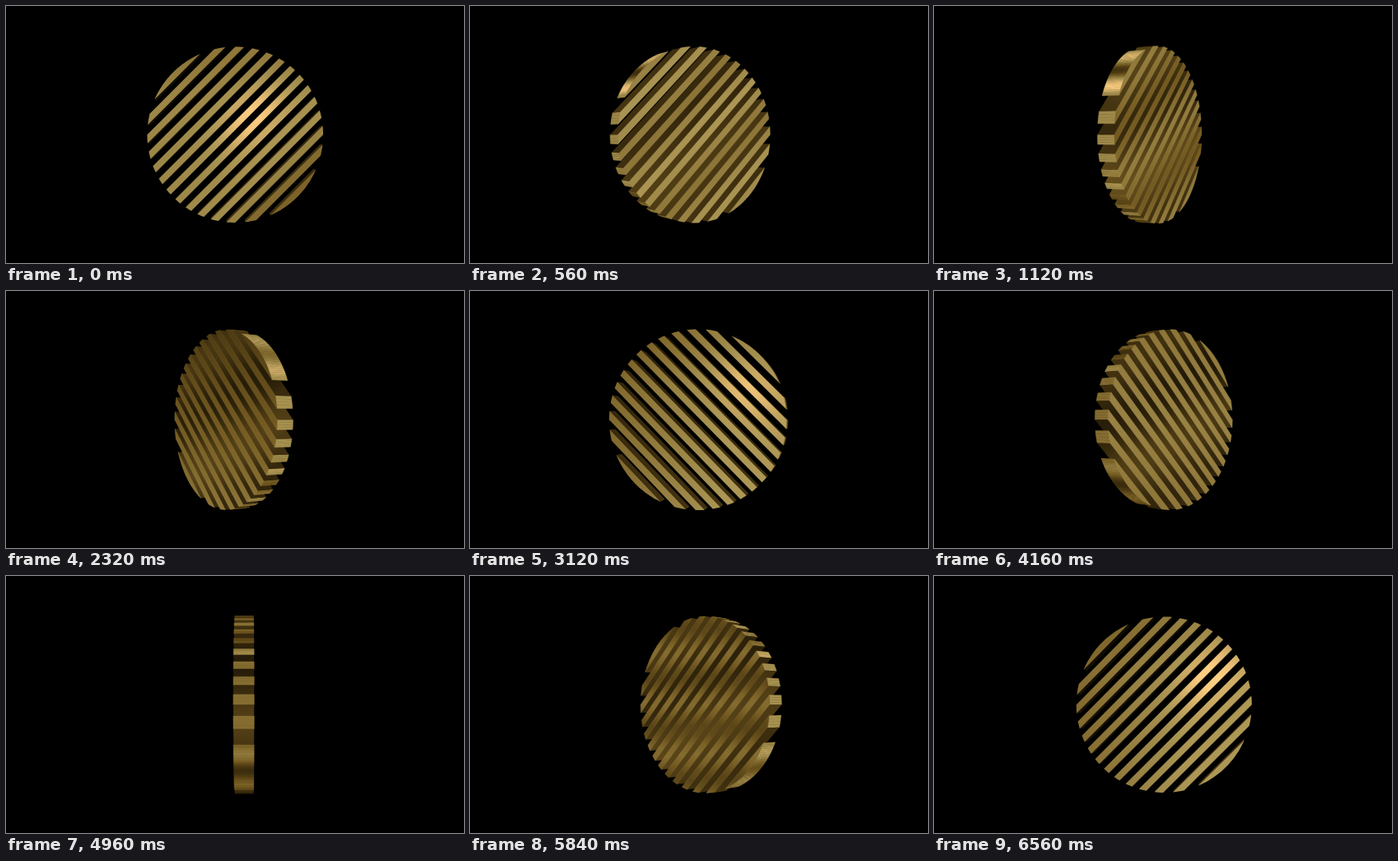
Write an HTML page with a canvas that moves like this. It is 556 by 312 pixels and loops after 6.64 s.

```html
<!DOCTYPE html>
<html lang="en">
<head>
<meta charset="utf-8">
<title>Golden disc</title>
<style>
html, body { margin: 0; width: 100%; height: 100%; overflow: hidden; background: #000; }
canvas { display: block; width: 100vw; height: 100vh; }
</style>
</head>
<body>
<canvas id="stage" width="556" height="312"></canvas>
<script>
const ctx = document.getElementById('stage').getContext('2d');
const LOOP = 6640, STEP = 80;
const CX = 278.2, CY = 156.2, R = 106.8, DEPTH = 22, CAMERA = 785;
const PITCH = 15.9, BAR = 7.9;
const RAMP = [[0, 3, 2, 0], [.2, 55, 41, 12], [.42, 117, 91, 33],
              [.68, 168, 147, 82], [.82, 206, 172, 102], [1, 255, 208, 132]];

const clamp = (v, lo, hi) => Math.min(hi, Math.max(lo, v));
const mix = (a, b, k) => a + (b - a) * k;
const smooth = (a, b, v) => { const k = clamp((v - a) / (b - a), 0, 1); return k * k * (3 - 2 * k); };
const bump = (v, width) => Math.exp(-(v * v) / (width * width));

function gold(v) {
  v = clamp(v, 0, 1);
  const i = Math.max(1, RAMP.findIndex(s => s[0] >= v));
  const a = RAMP[i - 1], b = RAMP[i], k = (v - a[0]) / (b[0] - a[0]);
  return `rgb(${[1, 2, 3].map(c => Math.round(mix(a[c], b[c], k)))})`;
}

// Bars lie along v at constant u; both axes are diagonal on the disc.
function makeBar(index) {
  const mid = (index - 6.5) * PITCH;
  const u0 = Math.max(-R, mid - BAR / 2), u1 = Math.min(R, mid + BAR / 2);
  const half = u => Math.sqrt(Math.max(0, R * R - u * u));
  const isCap = index === 0 || index === 13;
  const a0 = Math.acos(clamp(u0 / R, -1, 1)), a1 = Math.acos(clamp(u1 / R, -1, 1));
  const count = isCap ? 16 : 4;
  const outline = [];
  for (let i = 0; i <= count; i++) {
    const a = mix(a0, a1, i / count);
    outline.push({ u: R * Math.cos(a), v: R * Math.sin(a) });
  }
  for (let i = count; i >= 0; i--) outline.push({ u: outline[i].u, v: -outline[i].v });
  return { mid: (u0 + u1) / 2, reach: Math.max(half(u0), half(u1)), outline };
}
const bars = Array.from({ length: 14 }, (_, i) => makeBar(i));

function area(points) {
  let sum = 0;
  points.forEach((p, i) => {
    const q = points[(i + 1) % points.length];
    sum += p[0] * q[1] - q[0] * p[1];
  });
  return sum;
}

function fill(points, style, seam) {
  ctx.beginPath();
  points.forEach(p => ctx.lineTo(p[0], p[1]));
  ctx.closePath();
  ctx.fillStyle = style;
  ctx.fill();
  if (seam) {
    ctx.strokeStyle = style;
    ctx.lineWidth = .4;
    ctx.stroke();
  }
}

function gradient(a, b, shade) {
  if (Math.hypot(a[0] - b[0], a[1] - b[1]) < 1) return gold(shade((a[0] - CX) / R, (a[1] - CY) / R));
  const g = ctx.createLinearGradient(a[0], a[1], b[0], b[1]);
  for (let i = 0; i <= 12; i++) {
    const k = i / 12;
    g.addColorStop(k, gold(shade((mix(a[0], b[0], k) - CX) / R, (mix(a[1], b[1], k) - CY) / R)));
  }
  return g;
}

// Brightness of the flat face at a point, for a tilt in degrees.
function faceShade(tilt, front) {
  const right = smooth(5, 35, tilt), left = smooth(10, 40, -tilt);
  const flat = (1 - right) * (1 - left);
  const steep = smooth(42, 65, Math.abs(tilt));
  const base = .65 * flat + mix(.61, .48, steep) * right + .41 * left;
  const turn = smooth(0, 4.5, -tilt);
  const hx = mix(.2, .55, turn), hy = mix(-.2, -.34, turn);
  const glow = bump(tilt, 17);
  const lean = front ? 1 : -1;
  return (x, y) => {
    const dx = x - hx, dy = y - hy;
    const across = (dx + lean * dy) * .707, along = (dx - lean * dy) * .707;
    let v = base + glow * .36 * bump(across, .24) * bump(along, .42);
    v += flat * (mix(.03, .17, turn) * Math.min(x, .3) - .1 * smooth(.3, 1, -y));
    if (front) {
      v -= flat * (1 - turn) * .2 * smooth(.75, 1.3, x + y);
      v -= left * .09 * Math.cos((y - .27) * 11);
      v += right * .08 * Math.cos((x + y) * 6);
    } else {
      v += left * .13 * y - right * .06 * Math.abs(y);
    }
    return v;
  };
}

function wallShade(tilt, front, facing) {
  const lit = smooth(8, 55, Math.abs(tilt));
  const base = mix(facing < 0 ? .2 : .08, front ? .27 : .22, lit);
  return (x, y) => base + lit * .07 * Math.sin(5 * y + 3 * x) + .04 * y;
}

function rimShade(ny, tilt, front) {
  const h = Math.abs(ny), amount = front && tilt > 0 && ny < 0 ? .34 : .14;
  const streak = smooth(.38, .48, h) * amount * Math.cos((h - .5) * 18);
  const base = tilt < 0 ? .67 : front ? .63 : .5;
  return base * mix(.45, 1, smooth(0, 35, Math.abs(tilt))) - .32 * Math.max(0, ny - .25) - .12 * smooth(.5, 1, -ny) + streak;
}

function drawBar(bar, project, tilt, front) {
  const n = bar.outline.length;
  const top = bar.outline.map(p => project(p.u, p.v, 0));
  const back = bar.outline.map(p => project(p.u, p.v, -DEPTH));
  const near = front ? top : back;
  const face = faceShade(tilt, front);

  bar.outline.forEach((p, i) => {
    const j = (i + 1) % n, q = bar.outline[j];
    const quad = [top[j], top[i], back[i], back[j]];
    if (area(quad) <= 0) return;
    if (Math.abs(p.u - q.u) < .001) {
      const facing = Math.sign(p.u - bar.mid);
      fill(quad, gradient(near[i], near[j], wallShade(tilt, front, facing)));
    } else {
      const ny = (p.u + q.u - p.v - q.v) / (2 * Math.SQRT2 * R);
      fill(quad, gold(rimShade(ny, tilt, front)), true);
    }
  });

  const z = front ? 0 : -DEPTH;
  const ends = [project(bar.mid, bar.reach, z), project(bar.mid, -bar.reach, z)];
  const polygon = front ? top : back.slice().reverse();
  if (area(polygon) <= 0) return;
  fill(polygon, gradient(ends[0], ends[1], face));

  // Polished rim of the face catches the light as the disc turns.
  ctx.globalAlpha = .55 * smooth(10, 45, Math.abs(tilt));
  ctx.strokeStyle = gradient(ends[0], ends[1], (x, y) => face(x, y) + .1 + .1 * Math.max(0, y));
  ctx.lineWidth = .6;
  ctx.beginPath();
  near.forEach(p => ctx.lineTo(p[0], p[1]));
  ctx.closePath();
  ctx.stroke();
  ctx.globalAlpha = 1;
}

function draw(time) {
  const angle = Math.floor(time % LOOP / STEP) * STEP / LOOP * Math.PI * 2;
  const sin = Math.sin(angle), cos = Math.cos(angle);
  const front = cos > 0;
  const tilt = Math.atan2(front ? sin : -sin, Math.abs(cos)) * 180 / Math.PI;
  const project = (u, v, z) => {
    const x = (u + v) / Math.SQRT2, y = (u - v) / Math.SQRT2;
    const scale = CAMERA / (CAMERA + x * sin - z * cos);
    return [CX + (x * cos + z * sin) * scale, CY + y * scale];
  };
  const eye = -CAMERA * sin / Math.SQRT2;

  ctx.fillStyle = '#000';
  ctx.fillRect(0, 0, 556, 312);
  bars.slice()
    .sort((a, b) => Math.abs(b.mid - eye) - Math.abs(a.mid - eye))
    .forEach(bar => drawBar(bar, project, tilt, front));
}

function tick() {
  draw(performance.now());
  requestAnimationFrame(tick);
}
tick();
</script>
</body>
</html>
```
